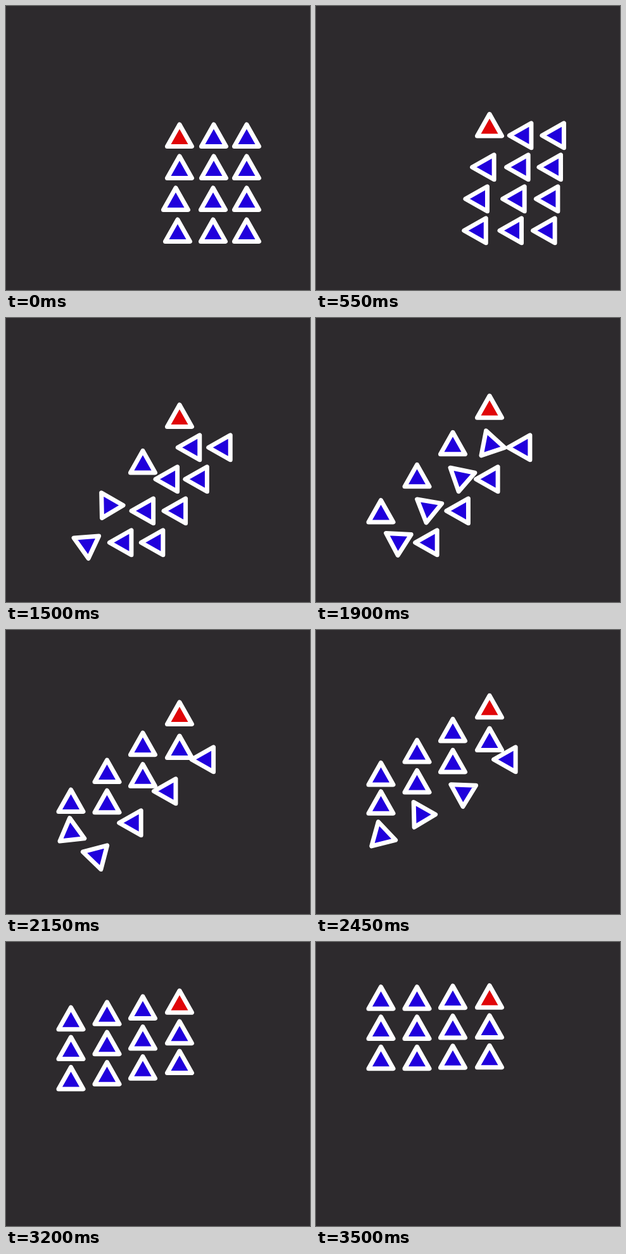
An HTML page with a canvas for the animation above (3.55 s loop, 480 by 448 pixels).

```html
<!DOCTYPE html>
<html lang="en">
<head>
<meta charset="utf-8">
<title>Marching triangles</title>
<style>
  html, body { margin: 0; width: 100%; height: 100%; overflow: hidden; background: #2d2a2d; }
  canvas { display: block; }
</style>
</head>
<body>
<canvas id="stage" width="480" height="448"></canvas>
<script>
const ctx = document.getElementById('stage').getContext('2d');
const LOOP = 3550, STEP = 50;
const START = 50, WALK = 385, END = 3430;
const TURN = 220;  // half the time spent rotating at a corner

// Each rank walks left to its own column, then climbs.
// climb: when the ascent begins; arrive: when the column is reached.
const ranks = [
  { xs: [274, 328, 380], column: 274,   top: 86,   climb: [85, 1650, 2810],   arrive: [0, 1890, 3020] },
  { xs: [274, 328, 380], column: 216,   top: 86.5, climb: [1120, 1810, 2430], arrive: [1260, 2027, 2600] },
  { xs: [268, 327, 380], column: 159.5, top: 88,   climb: [1370, 1830, 2280], arrive: [1490, 2027, 2482] },
  { xs: [271, 327, 380], column: 102.5, top: 88,   climb: [1550, 1860, 2200], arrive: [1645, 2062, 2397] }
];

const marchers = ranks.flatMap((rank, r) => rank.xs.map((x, i) => ({
  x, y: 204.3 + 50 * r,
  column: rank.column,
  endY: rank.top + 47.3 * i,
  climb: rank.climb[i],
  arrive: rank.arrive[i],
  leader: r === 0 && i === 0
})));

const progress = (t, from, to) => Math.min(1, Math.max(0, (t - from) / (to - from)));
const mix = (a, b, p) => a + (b - a) * p;

function pose(m, t) {
  const y = mix(m.y, m.endY, progress(t, m.climb, END));
  if (m.leader) return [m.x, y, 0];
  const x = mix(m.x, m.column, progress(t, WALK, m.arrive) ** 1.05);
  const corner = (m.climb + m.arrive) / 2;
  const quarter = progress(t, corner - TURN, corner + TURN) - progress(t, START, WALK);
  return [x, y, quarter * Math.PI / 2];
}

function drawTriangle(x, y, angle, color) {
  ctx.save();
  ctx.translate(x, y);
  ctx.rotate(angle);
  ctx.beginPath();
  ctx.moveTo(0, -17.3);
  ctx.lineTo(19.5, 17.2);
  ctx.lineTo(-19.5, 17.2);
  ctx.closePath();
  ctx.fillStyle = color;
  ctx.fill();
  ctx.stroke();
  ctx.restore();
}

function draw(now) {
  const t = Math.floor(now % LOOP / STEP) * STEP;
  ctx.fillStyle = '#2d2a2d';
  ctx.fillRect(0, 0, 480, 448);
  ctx.strokeStyle = '#fff';
  ctx.lineWidth = 7;
  ctx.lineJoin = 'round';
  for (const m of marchers) drawTriangle(...pose(m, t), m.leader ? '#e00508' : '#2000dc');
  requestAnimationFrame(draw);
}
requestAnimationFrame(draw);
</script>
</body>
</html>
```
